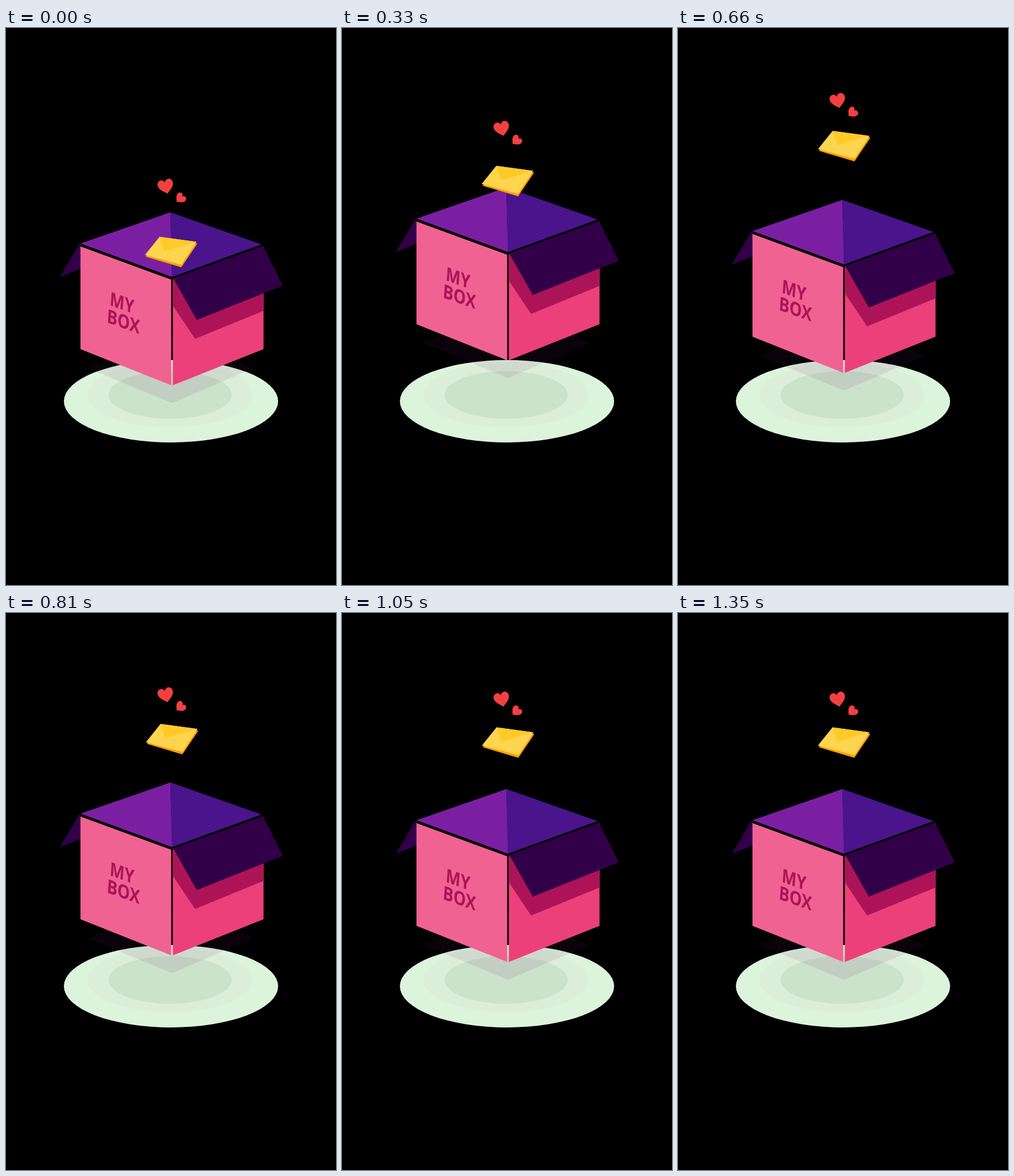
An HTML page for the animation above (2250 ms loop, 576 by 973 pixels).

```html
<!DOCTYPE html>
<html lang="en">
<head>
<meta charset="utf-8">
<title>My box</title>
<style>
  html, body { margin: 0; width: 100%; height: 100%; overflow: hidden; background: #000; }
  svg { display: block; width: 100%; height: 100%; }
  text { font: 700 33px "Open Sans", "Noto Sans", sans-serif; fill: #ad1457; }
</style>
</head>
<body>
<svg viewBox="0 0 576 973">
  <defs>
    <path id="heart" fill="#f34140" d="M0 13C-5 8-14 3-14-5C-14-10-10-13-7-13C-4-13-1-11 0-8C1-11 4-13 7-13C10-13 14-10 14-5C14 3 5 8 0 13Z"/>
  </defs>

  <ellipse cx="288" cy="652" rx="187" ry="72" fill="#dcf4dc"/>
  <ellipse cx="286.5" cy="641" rx="144.5" ry="56.5" fill="#dbeed9"/>
  <ellipse cx="286.5" cy="641" rx="107.5" ry="41.5" fill="#cbe2cb"/>

  <g id="box">
    <path fill="#6a2070" fill-opacity=".1" d="M142 594L290 534L432 594L290 655Z"/>
    <path fill="#320048" d="M128.5 377L94 435L131 420V378Z"/>
    <path fill="#7b1fa2" d="M130 376.5L287 322L290 435Z"/>
    <path fill="#4a148c" d="M287 322L446 378L289.5 435Z"/>
    <path fill="#f06292" d="M130 381.5L288.3 439.5V624L130 561Z"/>
    <path fill="#ec407a" d="M291.3 440L449.5 382V561L291.3 624Z"/>
    <path fill="#ad1457" d="M291.3 438L449.5 382V494L330 543L291.3 485Z"/>
    <path fill="#320048" d="M292 437.5L448.5 381L483 450L333 510Z"/>
    <g transform="matrix(.82 .295 -.07 1 180.6 484)">
      <text>MY</text>
      <text x="-3.5" y="31">BOX</text>
    </g>
  </g>

  <g id="letter">
    <path fill="#ffa000" d="M269 369L334 376.5L306 418L244 399.5Z"/>
    <path fill="#ffd54f" d="M268 364.7L332.5 373.5L306 413.5L242.5 396.5Z"/>
    <path fill="#ffca28" d="M268 364.7L332.5 373.5L276 390Z"/>
  </g>

  <g id="hearts">
    <use href="#heart" transform="translate(279 277.2) rotate(-13) scale(.97)"/>
    <use href="#heart" transform="translate(304 297.9) rotate(46) scale(.66)"/>
  </g>
</svg>
<script>
  const LOOP = 2250, STEP = 30;

  // Each part climbs to its resting height, then hops: [from, to, height].
  const parts = [
    { id: "box", rest: 14.5, drift: 0, hops: [[105, 565, 29], [565, 1050, 11.5]] },
    { id: "letter", rest: 165, drift: .0105, hops: [[470, 840, 20], [1050, 1350, 16]] },
    { id: "hearts", rest: 126, drift: 0, hops: [[437, 845, 24], [1050, 1350, 21]] }
  ];

  const climb = u => 1 - (1 - Math.min(u, 1)) ** 1.15;

  function arc(t, [from, to, height]) {
    const u = (t - from) / (to - from);
    return Math.max(0, 4 * height * u * (1 - u));
  }

  const heightAt = ({ rest, hops }, t) =>
    hops.reduce((sum, hop) => sum + arc(t, hop), rest * climb(t / hops[0][0]));

  function draw(ms) {
    const t = Math.floor((ms % LOOP) / STEP) * STEP;
    for (const part of parts) {
      const h = heightAt(part, t);
      document.getElementById(part.id)
        .setAttribute("transform", `translate(${h * part.drift} ${-h})`);
    }
  }

  let start;
  function tick(now) {
    start ??= now;
    draw(now - start);
    requestAnimationFrame(tick);
  }
  draw(0);
  requestAnimationFrame(tick);
</script>
</body>
</html>
```
